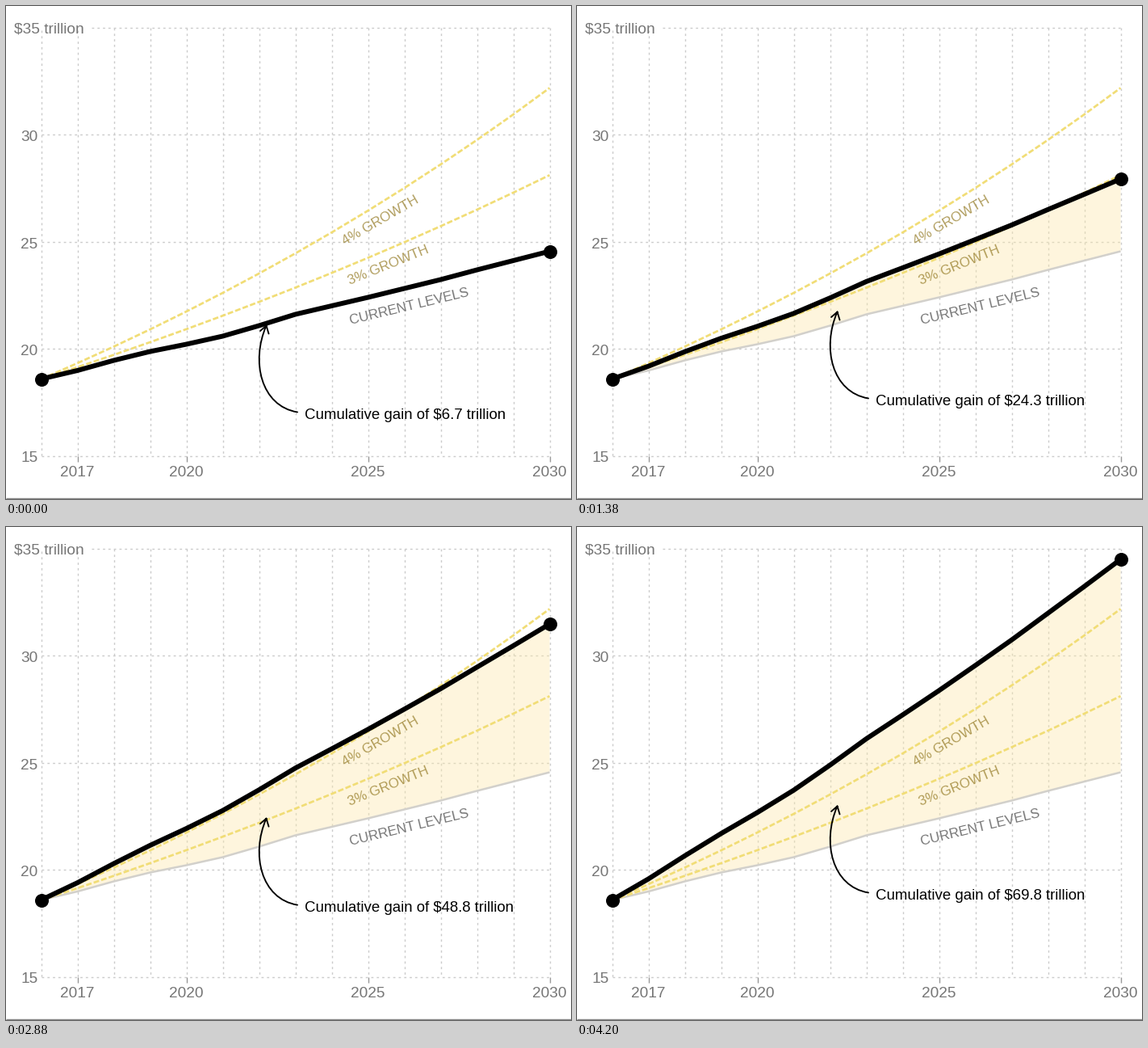
Recreate the animation shown at these times as a matplotlib script. Size 700 by 610 pixels, loop 4220 ms.

```python
import numpy as np
import matplotlib.pyplot as plt
from matplotlib.animation import FuncAnimation
from matplotlib.path import Path
from matplotlib.patches import PathPatch, Polygon

W, H, DPI = 700, 610, 100
STEP, FRAMES = 20, 211
PT = 72 / DPI  # points per pixel

GREY, GRID, YELLOW = "#767676", "#cccccc", "#f1dd76"
OLIVE = "#967d28"

plt.rcParams["font.family"] = "Liberation Sans"
fig = plt.figure(figsize=(W / DPI, H / DPI), dpi=DPI, facecolor="white")
ax = fig.add_axes([0, 0, 1, 1])
ax.set_xlim(0, W)
ax.set_ylim(H, 0)
ax.axis("off")

years = np.arange(15)
xs = 43.5 + 45 * years


def y_of(value):
    return 556.5 - 26.5 * (value - 15)


def line(x, y, width, color, z, dash=None, cap="butt"):
    style = "-" if dash is None else (0, tuple(d / width for d in dash))
    return ax.plot(x, y, lw=width * PT, color=color, ls=style, zorder=z,
                   dash_capstyle=cap, solid_capstyle=cap,
                   solid_joinstyle="round")[0]


def label(x, y, text, size=19, color=GREY, z=8, **kw):
    return ax.text(x, y, text, fontsize=size * PT, color=color, zorder=z,
                   va="baseline", **kw)


# Grid, ticks and axis labels
for x in xs:
    line([x, x], [30 if x < 120 else 26.5, 556.5], 1.4, GRID, 1, (2.8, 4))
for value in (15, 20, 25, 30, 35):
    y = y_of(value)
    left = 106 if value == 35 else 43.5
    line([left, 673.5], [y, y], 1.4, GRID, 1, (2.8, 4))
    if value < 35:
        label(39.5, y + 8, str(value), ha="right")
label(10.5, 33.5, "$35 trillion", size=19.2)
for year in (2017, 2020, 2025, 2030):
    x = xs[year - 2016]
    line([x, x], [556.5, 564], 1.4, "#999999", 2)
    label(x, 581.5, str(year), ha="center")
line([0, W], [609, 609], 1.3, "#8a8a8a", 2)

# Scenario lines
base = np.array([461.5, 451, 438.5, 427.5, 418.5, 408.5, 395.5, 381.5,
                 371, 360.5, 349.5, 338.5, 326.5, 315, 303.5])
line(xs, base, 2.5, "#d2d0cb", 4)
for rate in (1.03, 1.04):
    line(xs, y_of(18.58 * rate ** years), 2.7, YELLOW, 5, (7, 2.8))

for x, y, text, angle, color, alpha in (
        (466, 269, "4% GROWTH", 30, OLIVE, 0.75),
        (475.3, 324.7, "3% GROWTH", 22, OLIVE, 0.75),
        (500.4, 376, "CURRENT LEVELS", 13.5, GREY, 1)):
    label(x, y, text, 17, color, ha="center", rotation=angle,
          rotation_mode="anchor", alpha=alpha)

# Moving parts
shape = 15.32 * years + 0.25 * years ** 2
shape = shape / shape[-1]

area = Polygon(np.column_stack([xs, base]), closed=True, lw=0,
               facecolor="#fde8aa", alpha=0.4, zorder=3)
ax.add_patch(area)
curve = line(xs, base, 6, "black", 6)
dots = ax.plot(xs[[0, -1]], base[[0, -1]], "o", ms=17 * PT, mew=0,
               color="black", zorder=7)[0]
gain_text = label(370, 511, "", 18.7, "black")

arrow_pts = np.array([(361, 502.5), (316, 495), (303, 440), (322.5, 395.5),
                      (315, 402), (322.5, 395.5), (325.5, 405.5)])
arrow_codes = [Path.MOVETO] + [Path.CURVE4] * 3 + [
    Path.MOVETO, Path.LINETO, Path.LINETO]
arrow = PathPatch(Path(arrow_pts, arrow_codes), fill=False, lw=1.9 * PT,
                  edgecolor="black", capstyle="round", joinstyle="round",
                  zorder=8)
ax.add_patch(arrow)

# Pace of the drag: time in ms, rise at 2030 in pixels, gain in trillions
times = [0, 560, 1080, 1380, 1920, 2360, 3240, 3360, 4040]
rises = [0, 49.5, 68.5, 89.5, 128, 154.5, 203.5, 220.5, 263.5]
gains = [6.7, 13.4, 18.6, 24.3, 34.9, 41.0, 54.2, 58.9, 69.8]


def update(i):
    t = i * STEP
    rise = np.interp(t, times, rises)
    gain = np.interp(t, times, gains)
    top = base - rise * shape
    curve.set_ydata(top)
    dots.set_ydata(top[[0, -1]])
    area.set_xy(np.column_stack([np.append(xs, xs[::-1]),
                                 np.append(top, base[::-1])]))
    lift = 0.19 * rise
    arrow.set_path(Path(arrow_pts - [0, lift], arrow_codes))
    gain_text.set_y(511 - lift)
    gain_text.set_text(f"Cumulative gain of \\${gain:.1f} trillion")
    return curve, dots, area, arrow, gain_text


anim = FuncAnimation(fig, update, frames=FRAMES, interval=STEP, repeat=True,
                     repeat_delay=0, blit=False)
plt.show()
```
